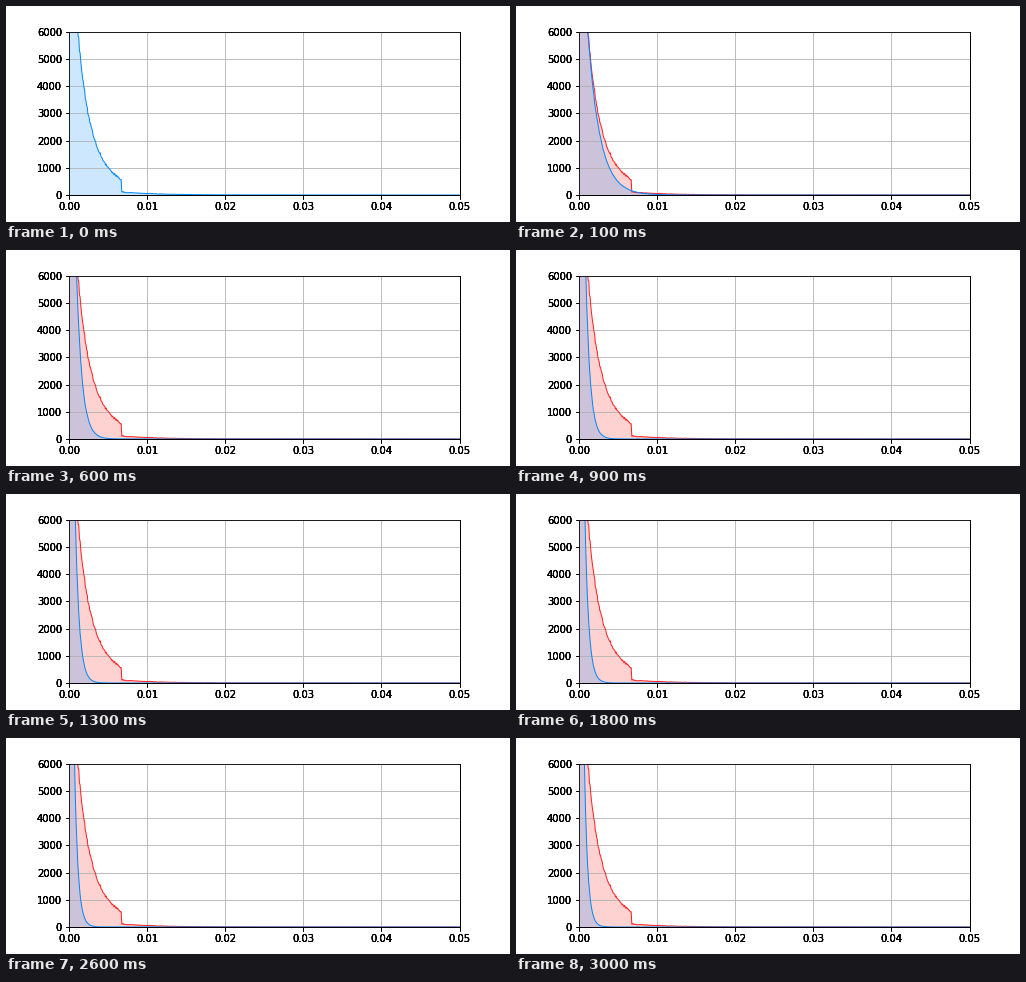
Write a matplotlib script that moves like this. It is 504 px wide and 216 px high and loops after 3600 ms.

```python
import numpy as np
import matplotlib.pyplot as plt
from matplotlib.animation import FuncAnimation

plt.rcParams["font.family"] = "DejaVu Sans"
plt.rcParams["font.size"] = 10

BLUE, RED = "#0088ff", "#ff2020"
X_MAX, Y_MAX = 0.05, 6000
CUT = 0.0067
STEPS, FRAMES, INTERVAL = 30, 36, 100
PIXEL = X_MAX / 390.6  # data units per horizontal pixel

# Step, decay rate per pixel, and pixel where the curve leaves the top
KEYS = np.array([
    (1, 0.083, 8.9), (2, 0.100, 8.8), (3, 0.115, 8.7), (5, 0.165, 7.9),
    (9, 0.230, 6.9), (13, 0.250, 6.4), (18, 0.265, 6.0),
    (22, 0.275, 5.7), (30, 0.300, 5.4),
])

x = np.linspace(0, X_MAX, 600)


def jitter(values, seed, amount):
    noise = np.random.default_rng(seed).standard_normal(len(values))
    return np.maximum(values + amount * np.sqrt(values) * noise, 0)


def start_curve():
    d = np.minimum(x, CUT) - 0.00115
    body = Y_MAX * np.exp(-560 * d + 25000 * d**2)
    tail = 110 * np.exp(-(x - CUT) / 0.0045)
    return jitter(np.where(x < CUT, body, tail), 4, 0.8)


def curve(step):
    if step == 0:
        return base
    rate = np.interp(step, KEYS[:, 0], KEYS[:, 1])
    top = np.interp(step, KEYS[:, 0], KEYS[:, 2])
    return jitter(Y_MAX * np.exp(-rate * (x / PIXEL - top)), step, 0.35)


def outline(y):
    return np.column_stack([np.r_[0, x, X_MAX], np.r_[0, y, 0]])


def add_axes(grid=False):
    ax = fig.add_axes([0.125, 0.125, 0.775, 0.755])
    ax.patch.set_visible(False)
    ax.set(xlim=(0, X_MAX), ylim=(0, Y_MAX))
    ax.set_xticks(np.arange(6) * 0.01)
    ax.set_yticks(np.arange(7) * 1000)
    ax.grid(grid)
    return ax


def add_area(color, y):
    fill, = ax.fill(*outline(y).T, color=color, alpha=0.2, lw=0)
    line, = ax.plot(x, y, color=color, lw=1)
    return fill, line


fig = plt.figure(figsize=(7, 3), dpi=72, facecolor="white")

# Stacked frames give the heavy labels
for _ in range(3):
    add_axes()
ax = add_axes(grid=True)

base = start_curve()
before = add_area(RED, base)
fill, line = add_area(BLUE, base)


def update(frame):
    step = min(frame, STEPS)
    y = curve(step)
    for part in before:
        part.set_visible(step > 0)
    fill.set_xy(outline(y))
    line.set_ydata(y)
    return (*before, fill, line)


anim = FuncAnimation(fig, update, frames=FRAMES, interval=INTERVAL,
                     repeat=True, repeat_delay=0)
plt.show()
```
